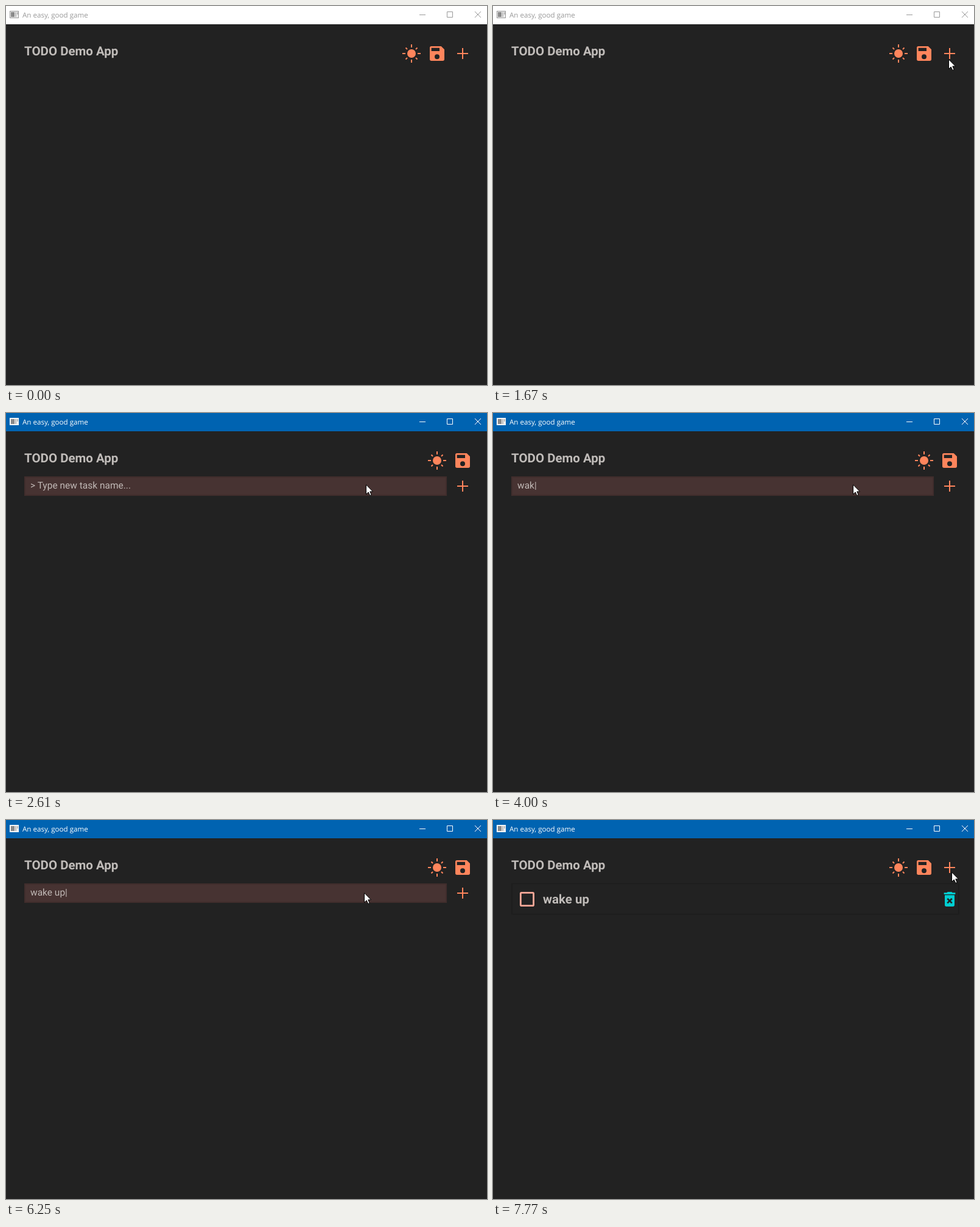
These frames come from a looping animation (790x622 px, 8000 ms). An HTML page:

```html
<!DOCTYPE html>
<html lang="en">
<head>
<meta charset="utf-8">
<title>Task list</title>
<style>
  html, body { margin: 0; width: 100%; height: 100%; overflow: hidden; background: #222; }
  svg { display: block; }
  text { font-family: Roboto, sans-serif; text-rendering: geometricPrecision; }

  .bar, .tools, .add, .field, .lines, .row, .pointer, .click {
    animation: 8s step-end infinite;
  }

  /* Window title */
  .bar { color: #999; fill: #fff; animation-name: activate; }
  .bar text { font: 11.6px "Open Sans", sans-serif; fill: currentColor; }
  .bar .lines-icon { fill: none; stroke: currentColor; }
  @keyframes activate {
    0% { color: #999; fill: #fff; }
    24% { color: #fff; fill: #0063b1; }
  }

  /* Toolbar */
  .coral { fill: #ff855c; }
  .rays { stroke: #ff855c; stroke-width: 2; }
  .heading { font-size: 20.5px; font-weight: 700; fill: #c0bcb9; }
  .tools { animation-name: tools; }
  .add { animation-name: add; }
  @keyframes tools {
    0%, 87.75% { transform: translate(0, 0); }
    24.875% { transform: translate(42px, 0); }
  }
  @keyframes add {
    0%, 87.75% { transform: translate(0, 0); }
    24.875% { transform: translate(0, 42px); }
  }

  /* Entry field: one line per typing state, shown through a clip */
  .field { opacity: 0; animation-name: field; }
  .field text { font-size: 15.5px; fill: #c1b9b6; }
  .lines { animation-name: type; }
  @keyframes field {
    0%, 87.75% { opacity: 0; }
    24.875% { opacity: 1; }
  }
  @keyframes type {
    0% { transform: translateY(0); }
    42.125% { transform: translateY(-32px); }
    43.625% { transform: translateY(-64px); }
    50% { transform: translateY(-96px); }
    51.5% { transform: translateY(-128px); }
    56% { transform: translateY(-160px); }
    59.875% { transform: translateY(-192px); }
    82.14% { transform: translateY(-224px); }
  }

  /* New task */
  .row { opacity: 0; animation-name: row; }
  @keyframes row {
    0% { opacity: 0; }
    87.75% { opacity: 1; }
  }

  /* Mouse */
  .pointer { opacity: 0; animation-name: appear, move; }
  .click { opacity: 0; animation-name: click; }
  @keyframes appear {
    0% { opacity: 0; }
    3.25% { opacity: 1; }
  }
  @keyframes click {
    0%, 24.875%, 87.75% { opacity: 0; }
    24%, 86.875% { opacity: 1; }
  }
  @keyframes move {
    0%, 3.25% { transform: translate(663px, 572px); }
    4.15% { transform: translate(665px, 540px); }
    5.05% { transform: translate(670px, 480px); }
    5.94% { transform: translate(677px, 400px); }
    6.84% { transform: translate(686px, 320px); }
    7.74% { transform: translate(695px, 250px); }
    8.64% { transform: translate(704px, 195px); }
    9.53% { transform: translate(711px, 155px); }
    10.43% { transform: translate(715px, 125px); }
    11.33% { transform: translate(713px, 105px); }
    12.23% { transform: translate(709px, 95px); }
    13.125% { transform: translate(706px, 90px); }
    14% { transform: translate(712px, 90px); }
    15% { transform: translate(722px, 90px); }
    16.1% { transform: translate(732px, 90px); }
    17.125% { transform: translate(738px, 90px); }
    20.875% { transform: translate(748px, 87px); }
    28.625% { transform: translate(738px, 91px); }
    29.29% { transform: translate(712px, 99px); }
    29.96% { transform: translate(678px, 107px); }
    30.625% { transform: translate(645px, 112px); }
    31.29% { transform: translate(616px, 115px); }
    31.96% { transform: translate(598px, 116px); }
    32.625% { transform: translate(591px, 117px); }
    78.125% { transform: translate(588px, 119px); }
    78.93% { transform: translate(594px, 123px); }
    79.73% { transform: translate(618px, 130px); }
    80.54% { transform: translate(655px, 134px); }
    81.34% { transform: translate(697px, 134px); }
    82.14% { transform: translate(732px, 131px); }
    82.95% { transform: translate(753px, 127px); }
    83.75% { transform: translate(760px, 125px); }
    92.5% { transform: translate(758px, 125px); }
    93.125% { transform: translate(756px, 125px); }
    95.375% { transform: translate(755px, 118px); }
    96.25% { transform: translate(754px, 98px); }
    97.125% { transform: translate(753px, 85px); }
  }
</style>
</head>
<body>
<svg width="790" height="622" viewBox="0 0 790 622">
  <rect width="790" height="622" fill="#222"/>

  <g class="bar">
    <rect width="790" height="30"/>
    <rect x="6.5" y="8.5" width="14" height="11" fill="#eee" stroke="currentColor"/>
    <path d="M8 10h6v8H8z" fill="#8a8a8a"/>
    <path d="M15 10h2v8h-2zM18 10h2v4h-2z" fill="#bbb"/>
    <text x="27" y="19">An easy, good game</text>
    <path class="lines-icon" d="M679 14.5h10M724.5 9.5h9v9h-9zM770 9l10 10M780 9l-10 10"/>
  </g>

  <text class="heading" x="30" y="81">TODO Demo App</text>

  <g class="tools">
    <g transform="translate(666 78)">
      <circle class="coral" r="7"/>
      <path class="rays" d="M0-15v5M0 10v5M-15 0h5M10 0h5M-9.5-9.5l2.5 2.5M9.5-9.5l-2.5 2.5M-9.5 9.5l2.5-2.5M9.5 9.5l-2.5-2.5"/>
    </g>
    <path class="coral" fill-rule="evenodd" transform="translate(692 62) scale(1.3333)"
      d="M17 3H5a2 2 0 0 0-2 2v14a2 2 0 0 0 2 2h14a2 2 0 0 0 2-2V7zM12 19a3 3 0 1 1 0-6 3 3 0 0 1 0 6zM15 9H5V5h10z"/>
  </g>
  <path class="add coral" d="M749 69h2v8h8v2h-8v8h-2v-8h-8v-2h8z"/>

  <g class="field">
    <rect x="31" y="105" width="692" height="30" fill="#473332" stroke="#402d2c" stroke-width="2"/>
    <svg x="40" y="104" width="680" height="32">
      <g class="lines">
        <text y="20">&gt; Type new task name...</text>
        <text y="52">w|</text>
        <text y="84">wa|</text>
        <text y="116">wak|</text>
        <text y="148">wake|</text>
        <text y="180">wake u|</text>
        <text y="212">wake up|</text>
        <text y="244">wake up</text>
      </g>
    </svg>
  </g>

  <g class="row">
    <rect x="31" y="104.5" width="734" height="50" fill="none" stroke="#1d1d1d" stroke-width="1.5"/>
    <rect x="45.4" y="119.4" width="21.2" height="21.2" rx="1.4" fill="none" stroke="#ffa898" stroke-width="2.8"/>
    <text class="heading" x="82" y="137">wake up</text>
    <g transform="translate(734 114) scale(1.3333)">
      <path fill="#00ced1" d="M6 7h12v12a2 2 0 0 1-2 2H8a2 2 0 0 1-2-2zM15.5 4l-1-1h-5l-1 1H5v2h14V4z"/>
      <path stroke="#222" stroke-width="2" d="M9.2 11.2l5.6 5.6M14.8 11.2l-5.6 5.6"/>
    </g>
  </g>

  <g class="pointer">
    <circle class="click" r="12" fill="#ff0" fill-opacity=".5"/>
    <path d="M.5.8V16.3L4.2 12.9 6.8 18.5 9.2 17.5 6.8 11.9H11.5z" fill="#fff" stroke="#000"/>
  </g>
</svg>
</body>
</html>
```
